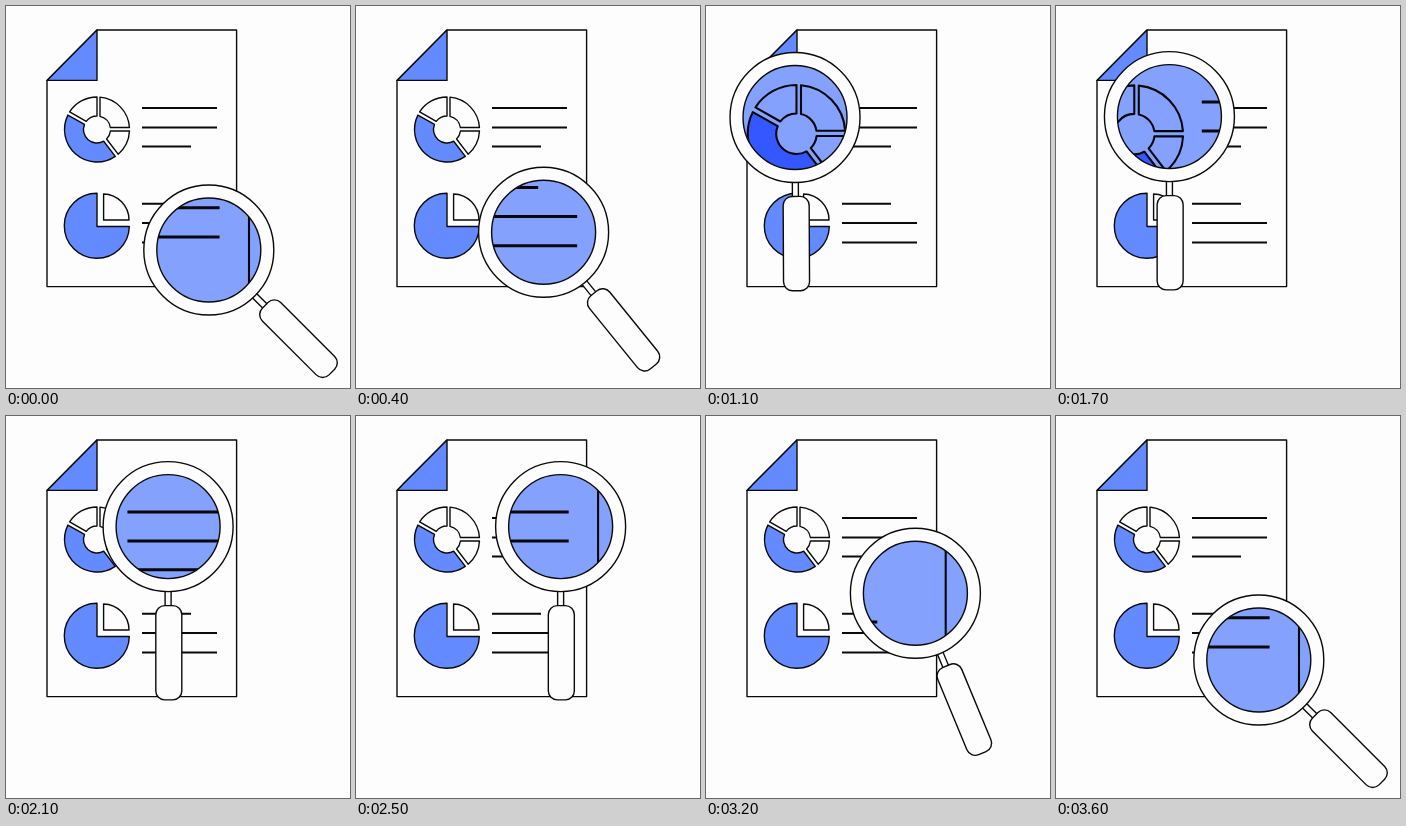
An HTML page that plays this animation: 344x382 px, repeating every 3.7 s.

```html
<!DOCTYPE html>
<html lang="en">
<head>
<meta charset="utf-8">
<title>Report under a magnifying glass</title>
<style>
  html, body { margin: 0; width: 100%; height: 100%; overflow: hidden; background: #fdfdfd; }
  svg { display: block; width: 344px; height: 382px; }
  .ink { fill: #fdfdfd; stroke: #0a0a0a; stroke-width: 1.4; stroke-linejoin: round; }
  .blue { fill: #648aff; }
  .text { fill: none; stroke: #0a0a0a; stroke-width: 2; }
  .tint { fill: #85a3ff; mix-blend-mode: multiply; }
  .rim { fill-rule: evenodd; }
</style>
</head>
<body>
<svg viewBox="0 0 344 382">
  <defs>
    <clipPath id="glass"><circle r="52"/></clipPath>
    <g id="doc">
      <path class="ink" d="M91 24H230.6V280.6H41V74.4Z"/>
      <path class="ink blue" d="M91 24V74.4H41Z"/>
      <g id="donut" transform="translate(91 123.5)"></g>
      <path class="ink blue" d="M91 220.5V187.3A32.5 32.5 0 1 0 123.3 220.5Z"/>
      <path class="ink" d="M97.6 214V188A26 26 0 0 1 123 214Z"/>
      <path class="text" d="M136 102H211M136 121.4H211M136 140.6H185M136 197.7H185M136 217H211M136 236.5H211"/>
    </g>
  </defs>

  <use href="#doc"/>

  <g id="lens">
    <g id="handle">
      <rect class="ink" x="-3" y="62" width="6" height="20"/>
      <rect class="ink" x="-12.3" y="79" width="26" height="94.3" rx="9"/>
    </g>
    <g clip-path="url(#glass)">
      <circle r="52" fill="#fdfdfd"/>
      <use id="zoom" href="#doc"/>
      <circle class="tint" r="53"/>
    </g>
    <path class="ink rim" d="M-65 0a65 65 0 1 0 130 0a65 65 0 1 0 -130 0ZM-52 0a52 52 0 1 0 104 0a52 52 0 1 0 -104 0Z"/>
  </g>
</svg>

<script>
  const $ = id => document.getElementById(id);
  const LOOP = 3700, STEP = 100, ZOOM = 1.5;

  // Ring slice between two angles (degrees); each cut is shifted inward by its gap.
  function slice(from, to, gapFrom, gapTo, cls = '') {
    const outer = 32.5, inner = 13.5, rad = Math.PI / 180;
    const at = (r, a) => `${(r * Math.cos(a)).toFixed(2)} ${(r * Math.sin(a)).toFixed(2)}`;
    const start = r => from * rad + Math.asin(gapFrom / r);
    const end = r => to * rad - Math.asin(gapTo / r);
    const large = r => +(end(r) - start(r) > Math.PI);
    return `<path class="ink ${cls}" d="M${at(outer, start(outer))}` +
      `A${outer} ${outer} 0 ${large(outer)} 1 ${at(outer, end(outer))}` +
      `L${at(inner, end(inner))}` +
      `A${inner} ${inner} 0 ${large(inner)} 0 ${at(inner, start(inner))}Z"/>`;
  }

  $('donut').innerHTML =
    slice(52.6, 209.5, 1.8, 1.8, 'blue') +
    slice(209.5, 270, 1.8, 0) +
    slice(270, 360, 3, 2) +
    slice(0, 52.6, 1.5, 1.8);

  const cubic = u => u < .5 ? 4 * u ** 3 : 1 - 4 * (1 - u) ** 3;
  const sine = u => (1 - Math.cos(Math.PI * u)) / 2;

  // Lens stops: x, y, handle angle
  const low = [202.8, 244, 45];
  const left = [88.3, 110.6, 0];
  const right = [216, 110.6, 0];
  const moves = [
    { start: 0, end: 1245, from: low, to: left, ease: cubic },
    { start: 1245, end: 2800, from: left, to: right, ease: sine },
    { start: 2800, end: 3600, from: right, to: low, ease: cubic }
  ];

  function pose(t) {
    const m = moves.find(m => t < m.end) || moves[moves.length - 1];
    const p = m.ease(Math.min(1, (t - m.start) / (m.end - m.start)));
    return m.from.map((v, i) => v + (m.to[i] - v) * p);
  }

  function draw(now) {
    const t = Math.floor(now % LOOP / STEP) * STEP;
    const [x, y, angle] = pose(t);
    $('lens').setAttribute('transform', `translate(${x} ${y})`);
    $('handle').setAttribute('transform', `rotate(${-angle})`);
    $('zoom').setAttribute('transform', `translate(-1.5 -1.8) scale(${ZOOM}) translate(${-x} ${-y})`);
    requestAnimationFrame(draw);
  }
  draw(performance.now());
</script>
</body>
</html>
```
